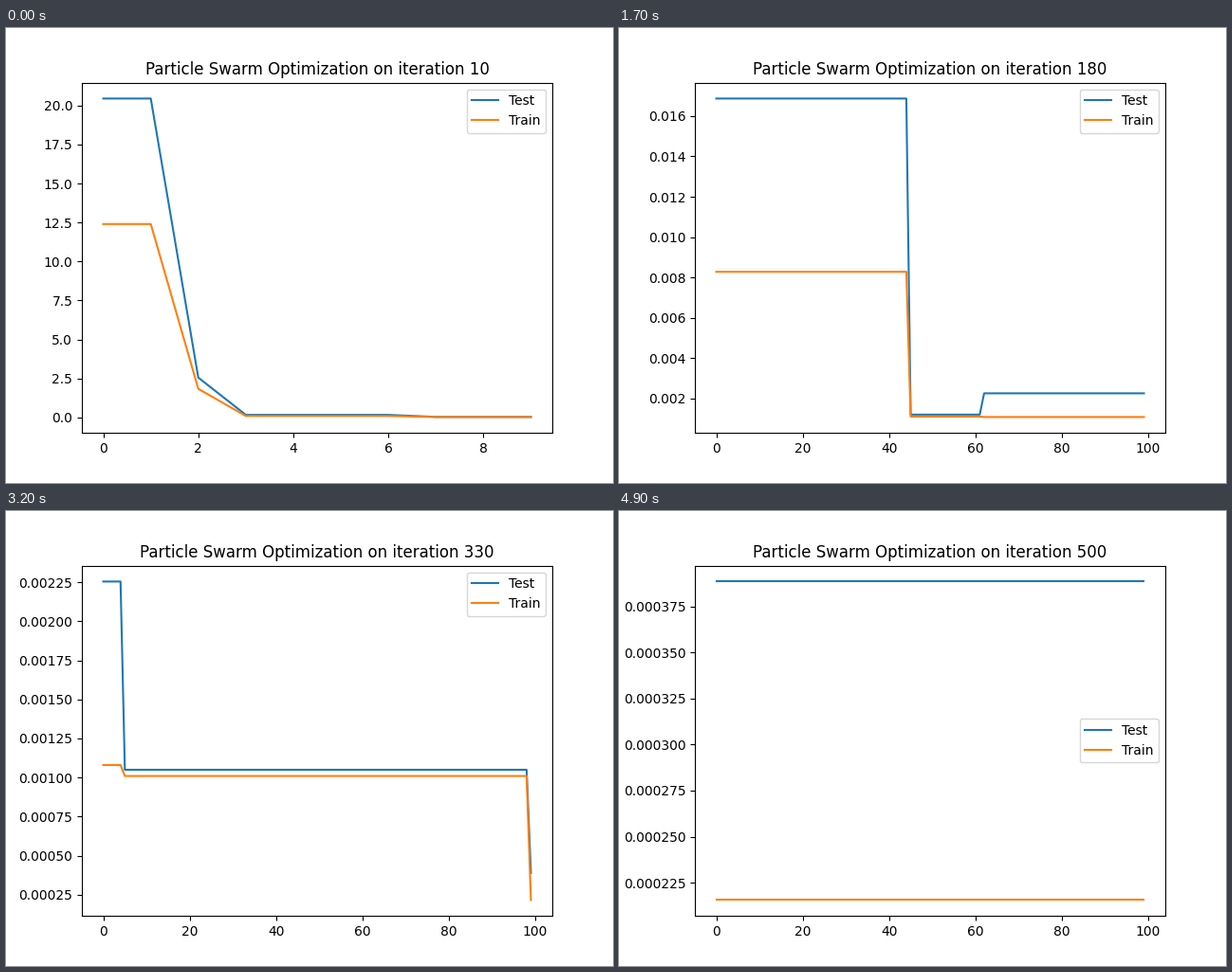
A matplotlib script that plays this animation: 640x480 px, repeating every 5910 ms.

```python
import numpy as np
import matplotlib.pyplot as plt
from matplotlib.animation import FuncAnimation

TICK = 30        # ms per frame
LOOP = 5910      # ms per loop
HOLD = 100       # ms each plot stays
ITERS = 500
WINDOW = 100     # iterations kept in view

# the swarm's improvements: iteration -> (test loss, train loss)
BEST = {
    0: (20.45, 12.4),
    2: (2.55, 1.83),
    3: (0.16, 0.09),
    7: (0.027, 0.021),
    25: (0.040965, 0.0185),
    42: (0.0158, 0.0089),
    44: (0.01687, 0.00828),
    125: (0.0012, 0.001104),
    142: (0.0022545, 0.0010797),
    235: (0.0010495, 0.0010096),
    329: (0.0003885, 0.0002156),
}


def hold(keys, count):
    """Keep each key's value until the next key."""
    held = np.searchsorted(list(keys), np.arange(count), side="right") - 1
    return np.array(list(keys.values()))[held].T


test, train = hold(BEST, ITERS)

plt.rcParams["font.family"] = "DejaVu Sans"
fig, ax = plt.subplots(figsize=(6.4, 4.8), dpi=100)


def update(i):
    step = (i * TICK + TICK - 10) // HOLD
    n = min(10 * (step + 1), ITERS)
    title = f"Particle Swarm Optimization on iteration {n}"
    if ax.get_title() == title:
        return
    ax.clear()
    view = slice(max(0, n - WINDOW), n)
    ax.plot(test[view], label="Test")
    ax.plot(train[view], label="Train")
    ax.set_title(title)
    ax.legend(loc="best")


anim = FuncAnimation(fig, update, frames=LOOP // TICK, interval=TICK,
                     repeat=True, repeat_delay=0)
plt.show()
```
